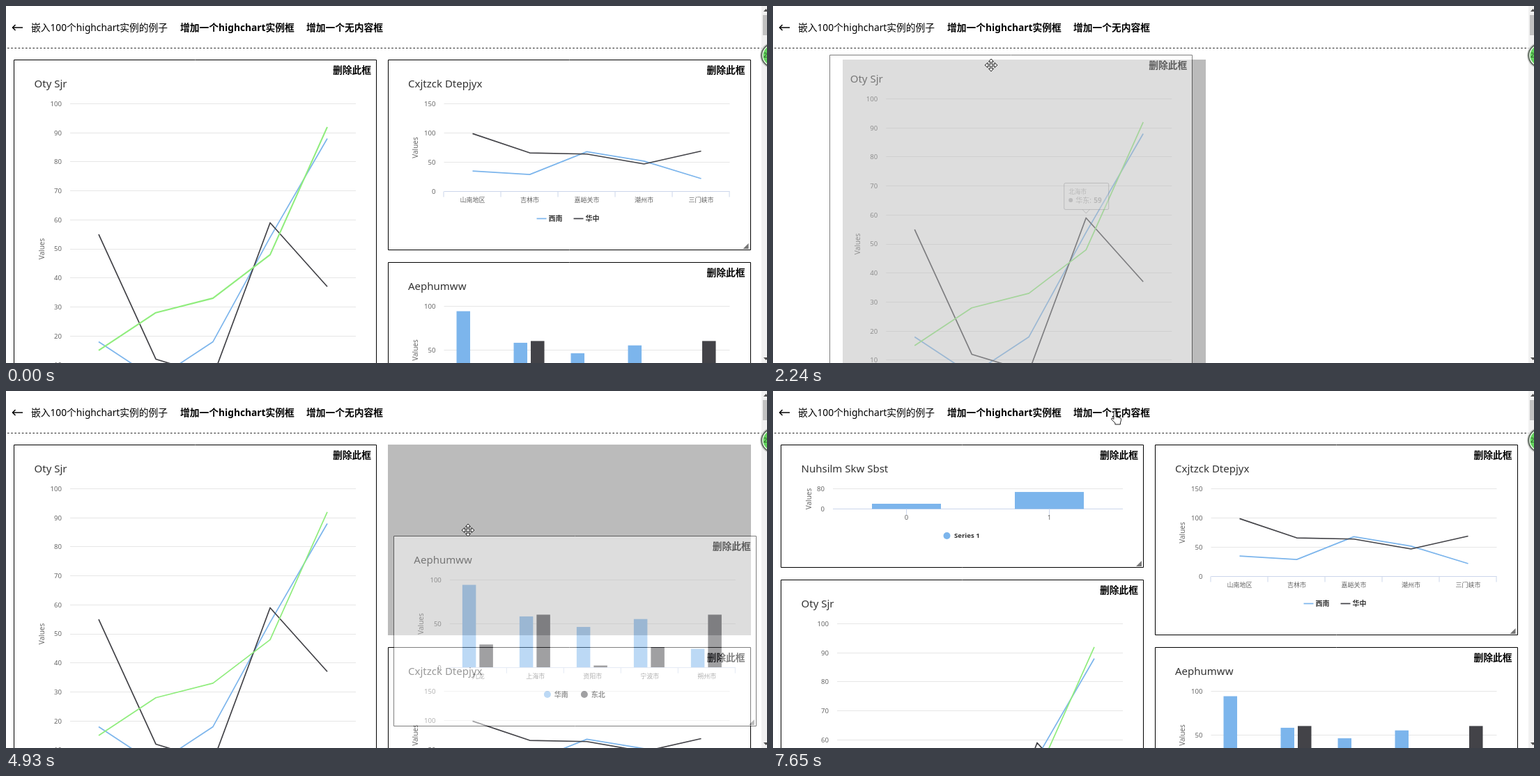
An HTML page with a canvas that plays this animation: 1092x513 px, repeating every 8 s.

```html
<!DOCTYPE html>
<html lang="zh">
<head>
<meta charset="utf-8">
<title>Chart grid</title>
<style>
  html, body { margin: 0; width: 100%; height: 100%; overflow: hidden; background: #fff; }
  canvas { display: block; }
</style>
</head>
<body>
<canvas id="stage" width="1092" height="513"></canvas>
<script>
const LOOP = 8000, W = 1092, H = 513;
const BLUE = '#7cb5ec', DARK = '#434348', GREEN = '#90ed7d', AXIS = '#ccd6eb', GRID = '#e6e6e6';
const FONT = '"Noto Sans", "Noto Sans CJK SC", "Noto Sans CJK", sans-serif';
const screen = document.getElementById('stage').getContext('2d');
const layer = new OffscreenCanvas(W, H).getContext('2d');
let g = screen; // context being drawn to

// ---- Drawing helpers ----

function text(str, x, y, size, { color = '#000', align = 'left', bold = false } = {}) {
  g.font = `${bold ? 'bold ' : ''}${size}px ${FONT}`;
  g.fillStyle = color;
  g.textAlign = align;
  g.fillText(str, x, y + size * 0.36);
}

function line(points, color, width = 1) {
  g.beginPath();
  points.forEach(([x, y]) => g.lineTo(x, y));
  g.strokeStyle = color;
  g.lineWidth = width;
  g.lineJoin = 'round';
  g.stroke();
}

function polygon(points, color) {
  g.fillStyle = color;
  g.beginPath();
  points.forEach(([x, y]) => g.lineTo(x, y));
  g.fill();
}

function dot(x, y, r, color) {
  g.fillStyle = color;
  g.beginPath();
  g.arc(x, y, r, 0, 7);
  g.fill();
}

function rect(x, y, w, h, color) {
  g.fillStyle = color;
  g.fillRect(x, y, w, h);
}

// ---- Motion: each move is [start, duration, x, y], eased from wherever the last one led ----

function ease(p) {
  p = Math.min(1, Math.max(0, p));
  return p * p * (3 - 2 * p);
}

function follow([x, y], moves, t) {
  for (const [start, duration, toX, toY] of moves) {
    const p = ease((t - start) / duration);
    x += (toX - x) * p;
    y += (toY - y) * p;
  }
  return [x, y];
}

const pointer = t => follow([975, 530], [
  [180, 500, 385, 315], [700, 230, 278, 94],
  [958, 554, 840, 108], [1699, 654, 268, 83],   // drag the tall card out and back
  [2640, 620, 613, 88],
  [3298, 300, 323, 80], [3629, 309, 628, 77],   // drag the line chart
  [4220, 260, 653, 392],
  [4607, 500, 667, 123], [5218, 418, 661, 402], // drag the bar chart up and down
  [5930, 670, 350, 38], [6900, 600, 493, 38]    // toolbar
], t);

// ---- Charts, in card coordinates ----

const TOP = 63.5, LEFT = 81, RIGHT = 491, SLOT = 82, BASE = 189.5;
const pointX = i => LEFT + SLOT * (i + 0.5);

function valueAxis(max, step, bottom, left = LEFT) {
  for (let v = 0; v <= max; v += step) {
    const y = bottom - (bottom - TOP) * v / max;
    line([[left, Math.floor(y) + 0.5], [RIGHT, Math.floor(y) + 0.5]], v ? GRID : AXIS);
    text(v, left - 12, y, 9.6, { color: '#666', align: 'right' });
  }
  g.save();
  g.translate(40, (TOP + bottom) / 2);
  g.rotate(-Math.PI / 2);
  text('Values', 0, 0, 10, { color: '#666', align: 'center' });
  g.restore();
}

function categories(names) {
  for (let i = 0; i <= names.length; i++) {
    const x = LEFT + SLOT * i - 0.5;
    line([[x, BASE], [x, BASE + 8]], AXIS);
  }
  names.forEach((n, i) => text(n, pointX(i), BASE + 12.5, 9, { color: '#666', align: 'center' }));
}

const plot = (values, scale, bottom, color, width = 1.7) =>
  line(values.map((v, i) => [pointX(i), bottom - v * scale]), color, width);

function legend(names, round) {
  names.forEach((n, i) => {
    const x = 214 + 53 * i, color = i ? DARK : BLUE;
    if (round) dot(x + 7, 228, 5, color);
    else line([[x, 228.5], [x + 14, 228.5]], color, 1.7);
    text(n, x + 17, 228, 10, { color: '#333', bold: true });
  });
}

function tooltip(x, y, alpha) {
  g.save();
  g.translate(x, y);
  g.globalAlpha = alpha;
  g.beginPath();
  g.roundRect(-31.5, -50, 64, 38, 2);
  g.fillStyle = 'rgba(247,247,247,.85)';
  g.fill();
  g.strokeStyle = DARK;
  g.lineWidth = 1;
  g.stroke();
  line([[-5, -12], [0, -6.5], [5, -12]], DARK);
  text('北海市', -25, -37.5, 8.6, { color: '#333' });
  dot(-22, -25.5, 3, DARK);
  text('华东:', -15, -25.5, 10, { color: '#333' });
  text('59', 11, -25.5, 10, { color: '#333', bold: true });
  g.restore();
}

function tallChart(t) {
  const bottom = 480.5, scale = 4.17;
  const overGreen = t < 400 || (t > 6150 && t < 6500), overDark = t > 480 && t < 960;
  valueAxis(100, 10, bottom);
  plot([18, 5, 18, 54, 88], scale, bottom, BLUE);
  plot([55, 12, 6, 59, 37], scale, bottom, DARK, overDark ? 2.4 : 1.7);
  plot([15, 28, 33, 48, 92], scale, bottom, GREEN, overGreen ? 2.1 : 1.7);
  const x = pointX(3), y = bottom - 59 * scale;
  if (overDark) dot(x, y, 4, DARK);
  if (t > 480 && t < 2630) tooltip(x, y, t < 1000 ? 1 : 0.35);
}

function lineChart() {
  valueAxis(150, 50, BASE);
  categories(['山南地区', '吉林市', '嘉峪关市', '潮州市', '三门峡市']);
  plot([35, 29, 68, 52, 22], 0.84, BASE, BLUE);
  plot([99, 66, 64, 47, 69], 0.84, BASE, DARK);
  legend(['西南', '华中'], false);
}

function barChart() {
  const bars = (values, offset, color) => values.forEach((v, i) =>
    rect(pointX(i) + offset, BASE - 0.5 - v * 1.26, 19.5, v * 1.26, color));
  valueAxis(100, 50, BASE);
  bars([94, 58, 46, 55, 21], -23, BLUE);
  bars([26, 60, 2, 23, 60], 1.5, DARK);
  categories(['九龙', '上海市', '资阳市', '宁波市', '朔州市']);
  legend(['华南', '东北'], true);
}

function addedChart(t) {
  const bottom = 92.5, grow = ease((t - 6800) / 880);
  valueAxis(80, 80, bottom, 75);
  [7.5, 24.5].forEach((height, i) => {
    const x = 131 + 205 * i, center = x + 49.5;
    rect(x, bottom - height * grow, 99, height * grow, BLUE);
    line([[center, bottom], [center, bottom + 8]], AXIS);
    text(i, center, bottom + 12.5, 9.6, { color: '#666', align: 'center' });
  });
  dot(238.5, 131, 5, BLUE);
  text('Series 1', 249, 131, 9.6, { color: '#333', bold: true });
}

// ---- Cards on a grid of columns and rows ----

const CARD_W = 521, ROW = 97, GAP = 17, LAG = 42, SETTLE = 200;
const cell = (col, row) => [11 + 89.42 * col, 77 + ROW * row];

const card = (title, rows, col, row, draw, drag) =>
  ({ title, h: rows * ROW - GAP, home: cell(col, row), moves: [], draw, drag });

const tall = card('Oty Sjr', 7, 0, 0, tallChart, [1000, 2630]);
const lines = card('Cxjtzck Dtepjyx', 3, 6, 0, lineChart, [3340, 4210]);
const bars = card('Aephumww', 3, 6, 3, barChart, [4649, 5920]);
const added = card('Nuhsilm Skw Sbst', 2, 0, 0, addedChart);
const ADD_TIME = 6780;

const place = (t, c, col, row) => c.moves.push([t, SETTLE, ...cell(col, row)]);
place(1010, tall, 1, 0);
place(1010, lines, 6, 7);
place(1010, bars, 6, 10);
place(1300, tall, 6, 0);
place(2000, tall, 1, 0);
place(2245, tall, 0, 0);
place(2245, lines, 6, 0);
place(2245, bars, 6, 3);
place(3470, lines, 3, 0);
place(3470, tall, 0, 3);
place(3790, lines, 6, 0);
place(3790, tall, 0, 0);
place(4725, bars, 6, 0);
place(4725, lines, 6, 3);
place(5503, bars, 6, 3);
place(5503, lines, 6, 0);
place(ADD_TIME, tall, 0, 2);

const spot = (c, t) => follow(c.home, c.moves, t);

// A dragged card trails the pointer, then settles into its spot
function position(c, t) {
  const rest = spot(c, t);
  if (!c.drag || t < c.drag[0]) return rest;
  const [start, end] = c.drag, settled = ease((t - end) / 100);
  const origin = spot(c, start), grabbed = pointer(start - LAG), now = pointer(Math.min(t, end) - LAG);
  return rest.map((v, i) => {
    const dragged = origin[i] + now[i] - grabbed[i];
    return dragged + (v - dragged) * settled;
  });
}

function drawCard(c, t) {
  const [x, y] = position(c, t), edge = Math.round(x) - x;
  g.save();
  g.translate(x, Math.round(y));
  rect(edge, 0, CARD_W, c.h, '#fff');
  c.draw(t);
  text(c.title, 29.5, 35, 15, { color: '#333' });
  text('删除此框', 513, 15, 13.75, { align: 'right', bold: true });
  polygon([[518, c.h - 10], [518, c.h - 2], [510, c.h - 2]], '#777');
  g.strokeStyle = '#000';
  g.lineWidth = 1;
  g.strokeRect(edge + 0.5, 0.5, CARD_W - 1, c.h - 1);
  g.restore();
}

// ---- Page furniture ----

function drawHeader() {
  line([[9, 31], [24, 31]], '#000', 1.5);
  line([[13.5, 27], [9.5, 31], [13.5, 35]], '#000', 1.5);
  text('嵌入100个highchart实例的例子', 36, 31, 13.75);
  text('增加一个highchart实例框', 250, 31, 13.75, { bold: true });
  text('增加一个无内容框', 431, 31, 13.75, { bold: true });
  g.setLineDash([2.6, 2.6]);
  line([[2, 60.5], [1084, 60.5]], '#222');
  g.setLineDash([]);
}

function drawEdge() {
  rect(1084, 0, 8, H, '#f1f1f1');
  rect(1086, 13, 6, 29, '#c1c1c1');
  polygon([[1087, 8], [1090.5, 4], [1094, 8]], '#505050');
  polygon([[1087, 505], [1090.5, 509], [1094, 505]], '#505050');
  ['#c4c4c4', '#4b5a4b', '#e9f5e6', '#62d35c'].forEach((color, i) => dot(1101, 71, 19 - 1.5 * i, color));
  text('2', 1087, 71, 9, { color: '#264d24' });
}

// Four arrows around a centre
const moveShape = new Path2D();
for (let i = 0; i < 4; i++) {
  const a = i * Math.PI / 2;
  for (const [x, y] of [[-1, -1], [-1, -5], [-3.5, -5], [0, -9], [3.5, -5], [1, -5], [1, -1]]) {
    moveShape.lineTo(x * Math.cos(a) - y * Math.sin(a), x * Math.sin(a) + y * Math.cos(a));
  }
}
moveShape.closePath();

const handShape = new Path2D('M-4-8a1.5 1.5 0 0 1 3 0v7l6 1.5q2 .8 1.6 3l-1.2 4.5v2h-7.5v-2l-5-5q-1-2 1-2l2 1.5z');

function drawPointer(t) {
  const [x, y] = pointer(t), shape = y < 60 ? handShape : moveShape;
  g.save();
  g.translate(Math.round(x), Math.round(y));
  g.fillStyle = '#fff';
  g.strokeStyle = '#222';
  g.lineWidth = 1;
  g.fill(shape);
  g.stroke(shape);
  g.restore();
}

function draw(t) {
  const held = [tall, lines, bars].find(c => t >= c.drag[0] && t < c.drag[1]);
  rect(0, 0, W, H, '#fff');
  drawHeader();
  for (const c of [tall, lines, bars, added]) {
    if (c !== held && (c !== added || t >= ADD_TIME)) drawCard(c, t);
  }
  if (held) {
    const [x, y] = spot(held, t);
    rect(Math.round(x), Math.round(y), CARD_W, held.h, '#bbb');
    g = layer;
    g.clearRect(0, 0, W, H);
    drawCard(held, t);
    g = screen;
    g.globalAlpha = 0.5;
    g.drawImage(layer.canvas, 0, 0);
    g.globalAlpha = 1;
  }
  drawEdge();
  drawPointer(t);
}

const start = performance.now();
function frame() {
  draw((performance.now() - start) % LOOP);
  requestAnimationFrame(frame);
}
frame();
</script>
</body>
</html>
```
